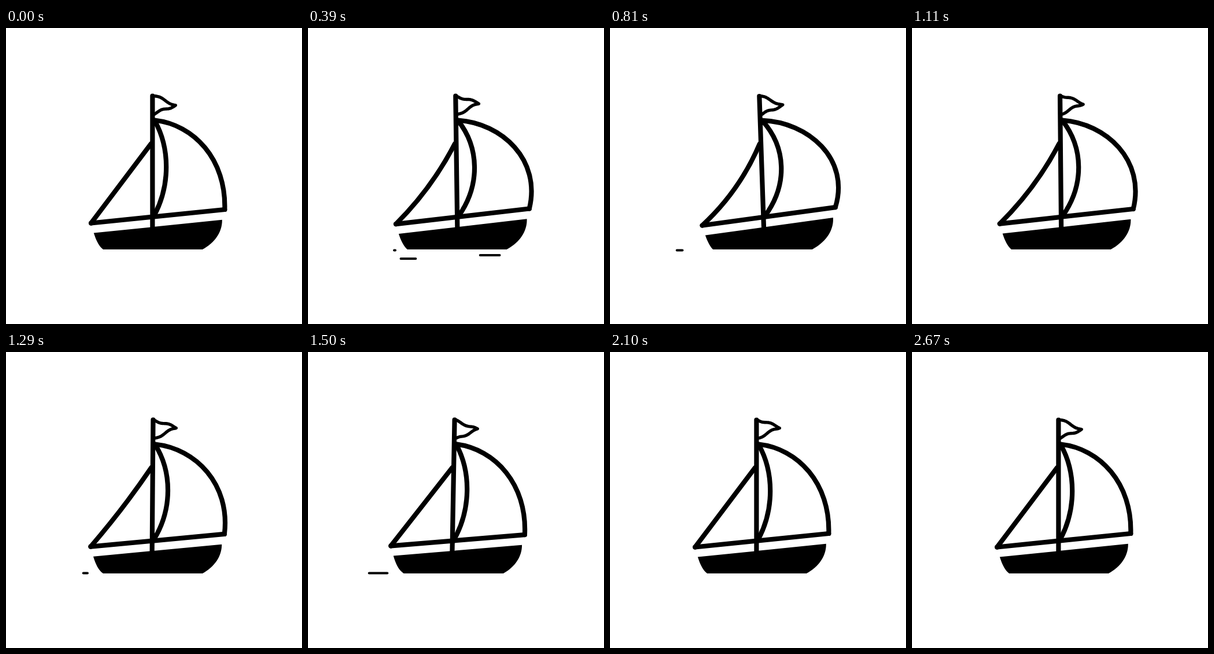
An HTML page for the animation above (2.7 s loop, 512 by 512 pixels).

```html
<!DOCTYPE html>
<html lang="en">
<head>
<meta charset="utf-8">
<title>Sailboat</title>
<style>
  html, body { margin: 0; width: 100%; height: 100%; overflow: hidden; background: #fff; }
  svg { display: block; width: 100vw; height: 100vh; }
  .line { fill: none; stroke: #000; stroke-width: 8.2; stroke-linecap: round; stroke-linejoin: round; }
  #flag { stroke-width: 5.4; }
  .water { stroke-width: 4; }
</style>
</head>
<body>
<svg viewBox="0 0 512 512">
  <defs>
    <clipPath id="sea"><rect width="512" height="383"/></clipPath>
  </defs>
  <g clip-path="url(#sea)">
    <g id="boat">
      <path d="M151.8 354.6L373.8 331.8C374.3 352 362 371 340 383L328 390H177L168 383C161 378 156 368 151.8 354.6Z"/>
      <path class="line" d="M253.4 117.5V348"/>
      <path class="line" d="M147.2 337.5L378.3 314"/>
      <path class="line" id="jib"/>
      <path class="line" id="main"/>
      <path class="line" id="luff"/>
      <path class="line" id="flag"/>
    </g>
  </g>
  <g id="waves"></g>
</svg>
<script>
const LOOP = 2700, FLAG_PERIOD = 900;
const $ = id => document.getElementById(id);
const clamp = v => Math.min(1, Math.max(0, v));
const ease = p => (1 - Math.cos(Math.PI * p)) / 2;

// keys: [time, value] pairs with eased steps between them
function track(keys, t) {
  let value = keys[0][1];
  for (let i = 1; i < keys.length; i++) {
    const [t0, v0] = keys[i - 1], [t1, v1] = keys[i];
    if (t >= t0) value = v0 + (v1 - v0) * ease(clamp((t - t0) / (t1 - t0)));
  }
  return value;
}

const SHIFT = [[180, 0], [690, 14.9], [1530, -4.7], [2070, 0]];
const TILT = [[180, 0], [690, -2.1], [1530, 1.05], [2070, 0]];
const WIND = [[0, 0], [600, 1], [900, 1], [1500, 0]];

const WAVES = [
  { x: 331.5, y: 393, start: 200 },
  { x: 186.3, y: 399, start: 245 },
  { x: 151, y: 384.5, start: 380 },
  { x: 141, y: 382.5, start: 1250 }
];
const WAVE_LENGTH = 35.3, GROW = 200, SHRINK_AT = 220, SHRINK = 290;

for (const w of WAVES) {
  w.el = document.createElementNS("http://www.w3.org/2000/svg", "path");
  w.el.setAttribute("class", "line water");
  $("waves").append(w.el);
}

function drawWave(w, t) {
  const age = t - w.start;
  const head = clamp(age / GROW), tail = clamp((age - SHRINK_AT) / SHRINK);
  const visible = age >= 0 && tail < 1;
  w.el.setAttribute("d", visible
    ? `M${w.x - tail * WAVE_LENGTH} ${w.y}L${w.x - head * WAVE_LENGTH - 0.01} ${w.y}` : "");
}

function flagEdge(x0, y0, x1, y1, phase) {
  const points = [];
  for (let i = 0; i <= 20; i++) {
    const u = i / 20;
    const swing = Math.sin(2 * Math.PI * (0.7 * (u - 0.5) + 0.5 - phase));
    const lift = Math.sin(Math.PI * u) * (0.3 + 3.1 * swing);
    points.push(`${(x0 + (x1 - x0) * u).toFixed(2)} ${(y0 + (y1 - y0) * u - lift).toFixed(2)}`);
  }
  return points;
}

function drawFlag(t) {
  const phase = t / FLAG_PERIOD + 0.05;
  const tipY = 132.6 + 1.2 * Math.cos(2 * Math.PI * phase);
  const top = flagEdge(254, 117, 293.3, tipY, phase);
  const bottom = flagEdge(257, 149, 293.3, tipY, phase).reverse();
  $("flag").setAttribute("d", "M" + top.concat(bottom).join("L"));
}

function draw(t) {
  const b = track(WIND, t);
  $("boat").setAttribute("transform",
    `translate(${track(SHIFT, t)} 0) rotate(${track(TILT, t)} 263 383)`);
  $("jib").setAttribute("d",
    `M251 200Q${199.1 + 15 * b} ${268.7 + 11 * b} 147.2 337.5`);
  $("main").setAttribute("d",
    `M257 159.5C${325 + 11 * b} ${167 - 2 * b} ${381 + 26 * b} ${227 + 4 * b} 378.3 314`);
  $("luff").setAttribute("d",
    `M257 160C${283.6 + 13.3 * b} 207 ${284.6 + 13.3 * b} 272 256 325`);
  drawFlag(t);
  for (const w of WAVES) drawWave(w, t);
}

const begin = performance.now();
function tick() {
  draw((performance.now() - begin) % LOOP);
  requestAnimationFrame(tick);
}
tick();
</script>
</body>
</html>
```
